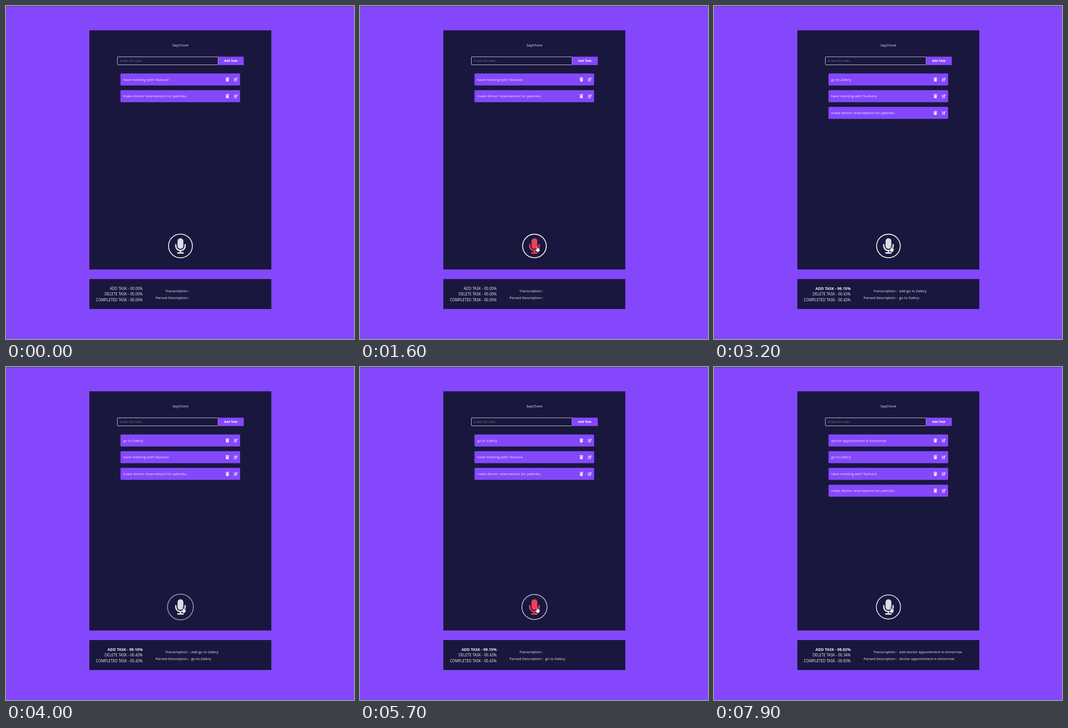
Recreate the animation shown at these times as an HTML page. Size 764x733 px, loop 8000 ms.

```html
<!DOCTYPE html>
<html lang="en">
<head>
<meta charset="utf-8">
<title>Voice task list</title>
<style>
  html, body { margin: 0; width: 100%; height: 100%; overflow: hidden; background: #8447fc; }
  svg { display: block; width: 764px; height: 733px; }
  text { font: 7.95px "Open Sans", "Noto Sans", sans-serif; fill: #f1eff8; }
  .panel { fill: #1a173e; }
  .accent { fill: #8447fc; }
  .mid { text-anchor: middle; }
  .end { text-anchor: end; }
  text.hint { font-size: 7px; fill: #716e88; }
  text.button { font-size: 6.6px; font-weight: 700; fill: #fff; }
  text.stat { font-size: 8.18px; }
  text.top { font-size: 8.45px; font-weight: 700; }
  .icon { fill: #e9e0ff; }
  #mic { color: #dddde7; }
  #mic.live { color: #ee3f5a; }
  .cursor { fill: #fff; stroke: #22202f; stroke-width: .8; stroke-linejoin: round; }
</style>
</head>
<body>
<svg viewBox="0 0 764 733">
  <defs>
    <g id="tools" class="icon">
      <path d="M482 9.2h2.5l.6-.7h1.8l.6.7h2.5v1.3h-8z"/>
      <path d="M482.6 11.1h6.8l-.5 5.9q0 .8-.8.8h-4.2q-.8 0-.8-.8z"/>
      <path d="M504.5 10.7H501v6h5.3v-3" fill="none" stroke="#e9e0ff" stroke-width="1.1"/>
      <path d="M502.6 15.2l.4-2 3.4-3.4 1.6 1.6-3.4 3.4zM506.8 9.4l.7-.7 1.6 1.6-.7.7z"/>
    </g>
  </defs>

  <rect class="accent" width="764" height="733"/>
  <rect width="764" height="1" fill="#53407f"/>
  <rect class="panel" x="183" y="53.5" width="399.5" height="526.5"/>
  <rect class="panel" x="183" y="601" width="399.5" height="66"/>

  <text class="mid" x="383" y="89">SayChore</text>
  <rect x="244.5" y="111.9" width="221" height="17.6" rx="1" fill="none" stroke="#d6d3e2"/>
  <text class="hint" x="250" y="123.3">A task for now...</text>
  <path class="accent" d="M465.5 111.5h55q1.5 0 1.5 1.5v15.5q0 1.5-1.5 1.5h-55z"/>
  <text class="button mid" x="493.7" y="123.3">Add Task</text>

  <g id="list"></g>

  <g id="mic">
    <circle id="ring" cx="383" cy="528.2" r="25.9" fill="none" stroke="#fff" stroke-width="1.8"/>
    <rect x="376.6" y="511.2" width="12.8" height="23.4" rx="6.4" fill="currentColor"/>
    <path d="M372.8 525.4v2.7a10.2 10.2 0 0 0 20.4 0v-2.7M383 538.5v4" fill="none"
      stroke="currentColor" stroke-width="3.1" stroke-linecap="round"/>
    <rect x="375.8" y="542" width="14.4" height="3.3" rx="1.1" fill="currentColor"/>
  </g>

  <text id="add" class="stat end" x="300" y="624.7"></text>
  <text id="del" class="stat end" x="300" y="637.3"></text>
  <text id="done" class="stat end" x="300" y="649.9"></text>
  <text class="end" x="402.5" y="629.8">Transcription :</text>
  <text class="end" x="402.5" y="644.6">Parsed Description :</text>
  <text id="heard" x="406.5" y="629.8"></text>
  <text id="parsed" x="406.5" y="644.6"></text>

  <path id="arrow" class="cursor" d="M0 0v11.6l2.7-2.5 1.8 4 1.9-.8-1.8-3.9h3.6z"/>
  <path id="hand" class="cursor" d="M-1 1q0-1.2 1-1.2t1 1.2v3.3l4 .8q1.4.4 1.3 1.9l-.5 3-1 2.8h-5l-3.4-4.5q-.5-1.2.8-1.4l1.8 1z"/>
</svg>

<script>
const LOOP = 8000, STEP = 100;
const ROW_TOP = 148.5, ROW_GAP = 36.8;
const PULSE = { period: 1500, rest: 150, grow: .1, fade: .45 };
const HOVER = { from: 900, to: 1300, start: [562, 198], stop: [388.5, 528.5] };

// Oldest task first; new ones are placed on top.
const tasks = [
  "make dinner reservations for yakiniku",
  "have meeting with Tavilune",
  "go to Zalbry",
  "doctor appointment is tomorrow"
];
const recordings = [[1400, 2500], [4100, 6500]];
const results = [
  { at: 0, count: 2, scores: ["00.00", "00.00", "00.00"] },
  { at: 2900, count: 3, scores: ["99.15", "00.43", "00.43"] },
  { at: 7000, count: 4, scores: ["98.82", "00.34", "00.83"] }
];

const $ = id => document.getElementById(id);
const place = (el, x, y) => el.setAttribute("transform", `translate(${x} ${y})`);
const show = (el, on) => el.setAttribute("visibility", on ? "visible" : "hidden");

$("list").innerHTML = tasks.map(name => `<g>
  <rect class="accent" x="251.3" width="262.7" height="26.5" rx="2"/>
  <text x="257" y="16.2">${name}</text>
  <use href="#tools"/></g>`).join("");
const rows = [...$("list").children];

function drawResult(t) {
  const { at, count, scores } = results.findLast(r => t >= r.at);
  rows.forEach((row, i) => {
    place(row, 0, ROW_TOP + (count - 1 - i) * ROW_GAP);
    show(row, i < count);
  });
  ["ADD", "DELETE", "COMPLETED"].forEach((label, i) => {
    $(["add", "del", "done"][i]).textContent = `${label} TASK - ${scores[i]}%`;
  });
  $("add").classList.toggle("top", at > 0);

  const latest = at > 0 ? tasks[count - 1] : "";
  const cleared = recordings.some(([start]) => start > at && t >= start);
  $("parsed").textContent = latest;
  $("heard").textContent = latest && !cleared ? "add " + latest : "";
}

function drawMic(t) {
  const live = recordings.some(([start, end]) => t >= start && t < end);
  $("mic").classList.toggle("live", live);
  const swell = (1 - Math.cos((t - PULSE.rest) / PULSE.period * 2 * Math.PI)) / 2;
  $("ring").setAttribute("r", 25.9 * (1 + PULSE.grow * swell));
  $("ring").setAttribute("opacity", 1 - PULSE.fade * swell);
}

function drawCursor(t) {
  const p = Math.min(1, Math.max(0, (t - HOVER.from) / (HOVER.to - HOVER.from)));
  const eased = p * p * (3 - 2 * p);
  const [x, y] = HOVER.start.map((a, i) => a + (HOVER.stop[i] - a) * eased);
  const overMic = Math.hypot(x - 383, y - 528) < 27;
  place($("arrow"), x, y);
  place($("hand"), x, y);
  show($("arrow"), t >= HOVER.from && !overMic);
  show($("hand"), overMic);
}

function frame() {
  const t = Math.floor(performance.now() % LOOP / STEP) * STEP;
  drawResult(t);
  drawMic(t);
  drawCursor(t);
  requestAnimationFrame(frame);
}
frame();
</script>
</body>
</html>
```
